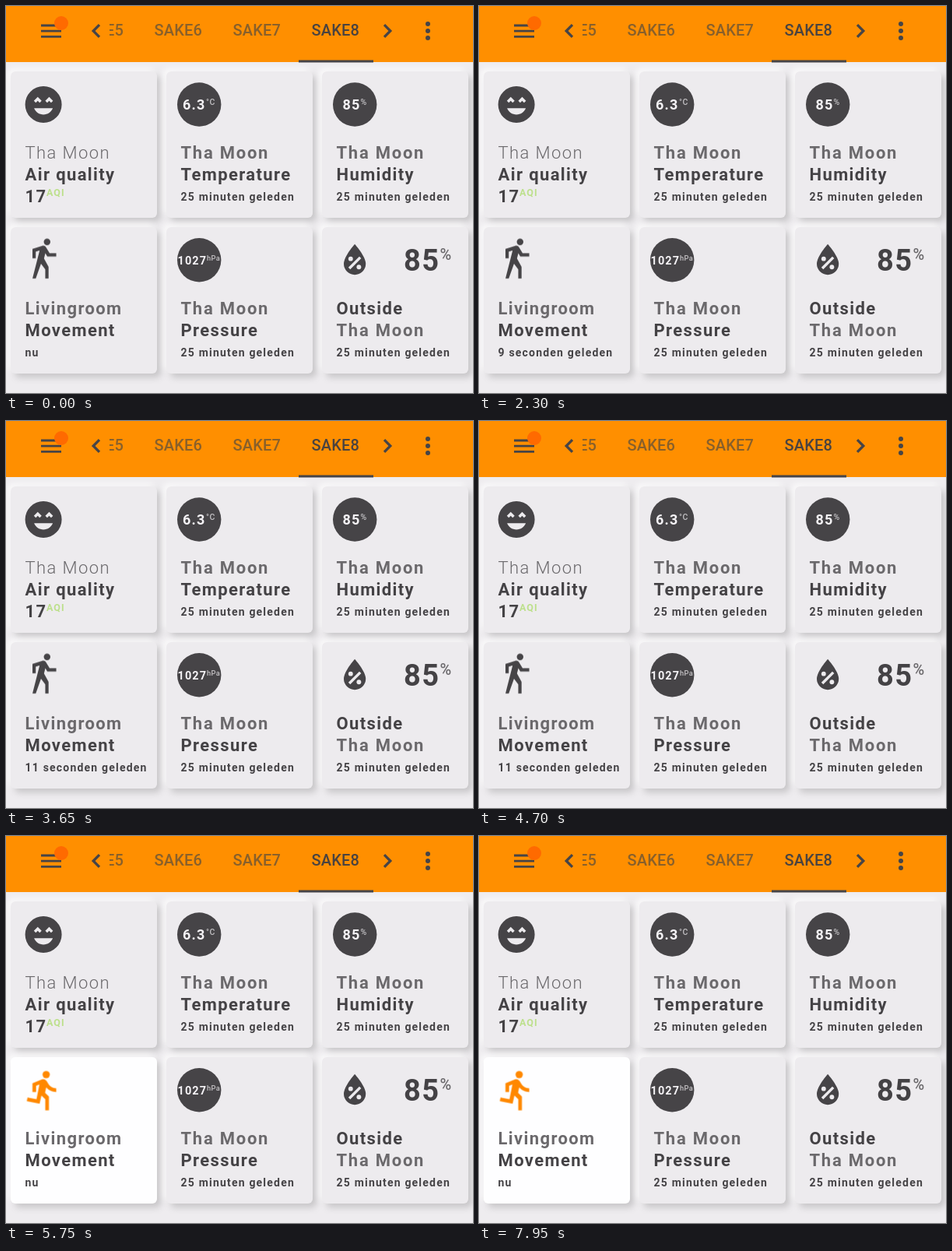
Write an HTML page that moves like this. It is 600x497 px and loops after 8 s.

```html
<!DOCTYPE html>
<html lang="nl">
<head>
<meta charset="utf-8">
<title>Dashboard</title>
<style>
  html, body { margin: 0; width: 100%; height: 100%; overflow: hidden; background: #eeecef; }
  svg { display: block; width: 600px; height: 497px; font-family: Roboto, sans-serif; }

  .ink { fill: #464447; }
  .line { fill: none; stroke: #464447; stroke-width: 3.3; }
  .card { fill: #edebee; filter: drop-shadow(5px 5px 4px rgba(0, 0, 0, .17)) drop-shadow(-4px -4px 4px rgba(255, 255, 255, .75)); }
  .tab { font-size: 20px; font-weight: 500; letter-spacing: .2px; fill: #88602b; }
  .tab.active { fill: #4a4340; }

  .title { font-size: 22px; font-weight: 700; letter-spacing: 1.38px; fill: #444245; }
  .muted { fill: #6b696c; }
  .moon { letter-spacing: 1.75px; }
  .thin { font-weight: 300; letter-spacing: 1.4px; }
  .since { font-size: 14px; font-weight: 700; letter-spacing: 1.2px; fill: #444245; }
  .aqi { font-size: 12.5px; font-weight: 700; letter-spacing: 1px; fill: #bde08c; }
  .value { font-size: 18px; font-weight: 700; letter-spacing: 1.2px; fill: #f4f2f5; }
  .value.small { font-size: 14.5px; letter-spacing: 1.1px; }
  .unit { font-size: 10.5px; font-weight: 500; letter-spacing: .5px; fill: #c4c2c5; }
  .unit.small { font-size: 9.3px; letter-spacing: .4px; }
  .big { font-size: 38px; font-weight: 700; letter-spacing: 1.4px; fill: #444245; }
  .big-unit { font-size: 20px; font-weight: 500; fill: #6b696c; }

  /* Movement sensor states, one 8 s cycle */
  .idle, .now, .nine, .eleven, .running { animation: 8s step-end infinite; }
  .idle { animation-name: idle; }
  .now { animation-name: now; }
  .nine { animation-name: nine; }
  .eleven { animation-name: eleven; }
  .running { animation-name: running; }
  @keyframes idle { 0% { opacity: 1; } 61.25%, 100% { opacity: 0; } }
  @keyframes running { 0% { opacity: 0; } 61.25%, 100% { opacity: 1; } }
  @keyframes now { 0% { opacity: 1; } 12.5% { opacity: 0; } 61.25%, 100% { opacity: 1; } }
  @keyframes nine { 0% { opacity: 0; } 12.5% { opacity: 1; } 37.5%, 100% { opacity: 0; } }
  @keyframes eleven { 0% { opacity: 0; } 37.5% { opacity: 1; } 61.25%, 100% { opacity: 0; } }

  .settle { transform-origin: 48px 326px; animation: settle 8s linear infinite; }
  @keyframes settle { 0%, 61.25% { transform: rotate(5deg); } 70%, 100% { transform: none; } }

  .alert { animation: alert 8s ease infinite; }
  @keyframes alert {
    0%, 61.875% { fill: #edebee; }
    74.375% { fill: #fefeff; }
    86.875% { fill: #edebee; }
    99.375%, 100% { fill: #fefeff; }
  }
</style>
</head>
<body>
<svg viewBox="0 0 600 497">
  <defs>
    <rect id="card" width="188" height="188" rx="6"/>
    <circle id="badge" r="28.2"/>
    <clipPath id="tabs"><rect x="133" width="340" height="72"/></clipPath>
  </defs>
  <rect width="600" height="497" fill="#eeecef"/>

  <use href="#card" class="card" x="6" y="84"/>
  <use href="#card" class="card" x="206" y="84"/>
  <use href="#card" class="card" x="406" y="84"/>
  <use href="#card" class="card alert" x="6" y="284"/>
  <use href="#card" class="card" x="206" y="284"/>
  <use href="#card" class="card" x="406" y="284"/>

  <!-- Header -->
  <rect width="600" height="72" fill="#ff8f00"/>
  <path class="line" style="stroke-width:2.8" d="M45 25H71M45 32.2H71M45 39.4H71"/>
  <circle cx="71" cy="22" r="9" fill="#ff6a00"/>
  <path class="line" d="M120 24.2L112.2 32L120 39.8M486 24.2L493.8 32L486 39.8"/>
  <g class="ink">
    <circle cx="542" cy="23" r="3"/>
    <circle cx="542" cy="32" r="3"/>
    <circle cx="542" cy="41" r="3"/>
    <rect x="376" y="69.5" width="96" height="3"/>
  </g>
  <g clip-path="url(#tabs)">
    <text class="tab" x="89.5" y="38">SAKE5</text>
    <text class="tab" x="190.5" y="38">SAKE6</text>
    <text class="tab" x="291.5" y="38">SAKE7</text>
    <text class="tab active" x="392.5" y="38">SAKE8</text>
  </g>

  <!-- Air quality -->
  <g class="ink" transform="translate(19.9 98.3) scale(2.35)">
    <path fill-rule="evenodd" d="M12 2A10 10 0 0 0 12 22A10 10 0 0 0 12 2ZM13 9.94L14.06 11L15.12 9.94L16.18 11L17.24 9.94L15.12 7.82ZM8.88 9.94L9.94 11L11 9.94L8.88 7.82L6.76 9.94L7.82 11ZM12 17.5C14.33 17.5 16.3 16.04 17.11 14H6.89C7.69 16.04 9.67 17.5 12 17.5Z"/>
  </g>
  <text class="title muted thin" x="24.5" y="195.5">Tha Moon</text>
  <text class="title" x="24.5" y="224">Air quality</text>
  <text class="title" x="24.5" y="252">17</text>
  <text class="aqi" x="52" y="244">AQI</text>

  <!-- Temperature -->
  <use href="#badge" class="ink" x="248.2" y="126.5"/>
  <text class="value" x="227" y="133.3">6.3</text>
  <text class="unit" x="257" y="127.3">°C</text>
  <text class="title muted moon" x="224.5" y="195.5">Tha Moon</text>
  <text class="title" x="224.5" y="224">Temperature</text>
  <text class="since" x="224.5" y="249.5">25 minuten geleden</text>

  <!-- Humidity -->
  <use href="#badge" class="ink" x="448.2" y="126.5"/>
  <text class="value" x="432.5" y="133.3">85</text>
  <text class="unit" x="455.5" y="127.3">%</text>
  <text class="title muted moon" x="424.5" y="195.5">Tha Moon</text>
  <text class="title" x="424.5" y="224">Humidity</text>
  <text class="since" x="424.5" y="249.5">25 minuten geleden</text>

  <!-- Movement -->
  <g class="ink idle" transform="translate(19.9 298.2) scale(2.35)">
    <path d="M14.12 10H19V8.2H15.38L13.38 4.87C13.08 4.37 12.54 4.03 11.92 4.03C11.74 4.03 11.58 4.06 11.42 4.11L6 5.8V11H7.8V7.33L9.91 6.67L6 22H7.8L10.67 13.89L13 17V22H14.8V15.59L12.31 11.05L13.04 8.18Z"/>
    <circle cx="14" cy="2" r="1.8"/>
  </g>
  <g class="running" fill="#ff8800">
    <g class="settle">
      <g transform="translate(19.9 298.2) scale(2.35)">
        <circle cx="13.49" cy="3.48" r="2"/>
        <path d="M9.89 19.38L10.89 14.98L12.99 16.98V22.98H14.99V15.48L12.89 13.48L13.49 10.48C14.79 11.98 16.79 12.98 18.99 12.98V10.98C17.09 10.98 15.49 9.98 14.69 8.58L13.69 6.98C13.29 6.38 12.69 5.98 11.99 5.98C11.69 5.98 11.49 6.08 11.19 6.08L5.99 8.28V12.98H7.99V9.58L9.79 8.88L8.19 16.98L3.29 15.98L2.89 17.98Z"/>
      </g>
    </g>
  </g>
  <text class="title muted" x="24.5" y="395.5">Livingroom</text>
  <text class="title" x="24.5" y="424">Movement</text>
  <text class="since now" x="24.5" y="449.5">nu</text>
  <text class="since nine" x="24.5" y="449.5">9 seconden geleden</text>
  <text class="since eleven" x="24.5" y="449.5">11 seconden geleden</text>

  <!-- Pressure -->
  <use href="#badge" class="ink" x="248.2" y="326.2"/>
  <text class="value small" x="220.5" y="331.7">1027</text>
  <text class="unit small" x="258" y="327">hPa</text>
  <text class="title muted moon" x="224.5" y="395.5">Tha Moon</text>
  <text class="title" x="224.5" y="424">Pressure</text>
  <text class="since" x="224.5" y="449.5">25 minuten geleden</text>

  <!-- Outside -->
  <g transform="translate(419.9 298.2) scale(2.35)">
    <path class="ink" d="M12 3.25S6 10 6 14A6 6 0 0 0 18 14C18 10 12 3.25 12 3.25Z"/>
    <g fill="#edebee">
      <path d="M14.47 9.97L15.53 11.03L9.53 17.03L8.47 15.97Z"/>
      <circle cx="9.75" cy="11.25" r="1.25"/>
      <circle cx="14.25" cy="15.75" r="1.25"/>
    </g>
  </g>
  <text class="big" x="511" y="340">85</text>
  <text class="big-unit" x="557.5" y="325.7">%</text>
  <text class="title" x="424.5" y="395.5">Outside</text>
  <text class="title muted moon" x="424.5" y="424">Tha Moon</text>
  <text class="since" x="424.5" y="449.5">25 minuten geleden</text>
</svg>
</body>
</html>
```
